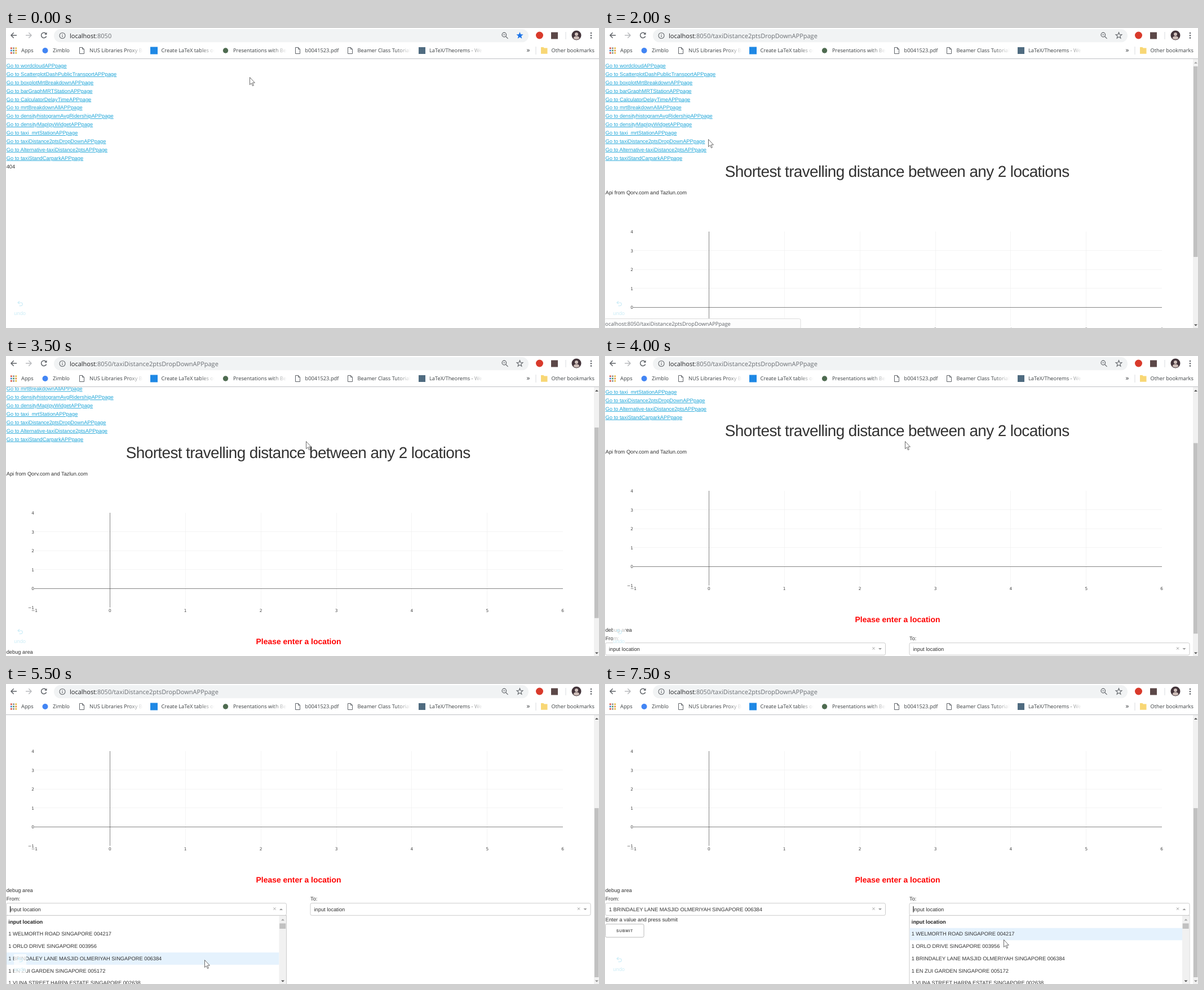
Recreate the animation shown at these times as an HTML page. Size 1052x532 px, loop 8000 ms.

```html
<!DOCTYPE html>
<html lang="en">
<head>
<meta charset="utf-8">
<title>Dash app walkthrough</title>
<style>
  html, body { margin: 0; width: 100%; height: 100%; overflow: hidden; background: #fff; }
  svg { display: block; }
  text { white-space: pre; text-rendering: geometricPrecision; }
  .page { font: 9.3px "Liberation Sans", Arial, sans-serif; fill: #323232; }
  .link { fill: #1ea5d8; text-decoration: underline; }
  .title { font-size: 27.95px; letter-spacing: -.62px; }
  .alert { font-size: 13.95px; font-weight: bold; fill: #f00; }
  .tick { font: 7.4px "DejaVu Sans", sans-serif; fill: #444; }
  .button { font-size: 6.8px; font-weight: bold; letter-spacing: .62px; fill: #555; }
  .bold { font-weight: bold; fill: #222; }
  .chrome { font: 9.3px "Open Sans", sans-serif; fill: #3c4043; }
  .url { font-size: 11px; }
  .status { font: 9.4px "Open Sans", sans-serif; fill: #5f6368; }
  .line { fill: none; stroke: #5f6368; stroke-width: 1.5; }
</style>
</head>
<body>
<svg id="stage" width="1052" height="532" viewBox="0 0 1052 532">
  <defs>
    <clipPath id="viewport"><rect y="55" width="1052" height="477"/></clipPath>
    <linearGradient id="fade"><stop stop-color="#fff" stop-opacity="0"/><stop offset="1" stop-color="#fff"/></linearGradient>
  </defs>
  <g id="page" clip-path="url(#viewport)"></g>
  <g id="chrome" class="chrome"></g>
  <g id="pointer"></g>
</svg>
<script>
const LOOP = 8000;
const VIEW = 477, TRACK_TOP = 68, TRACK = 452;
const ROUTE = 'taxiDistance2ptsDropDownAPPpage';
const LINKS = ['wordcloud', 'ScatterplotDashPublicTransport', 'boxplotMrtBreakdown',
  'barGraphMRTStation', 'CalculatorDelayTime', 'mrtBreakdownAll', 'densityhistogramAvgRidership',
  'densityMapIpyWidget', 'taxi_mrtStation', 'taxiDistance2ptsDropDown',
  'Alternative-taxiDistance2pts', 'taxiStandCarpark'];
const PLACES = ['input location', '1 WELMORTH ROAD SINGAPORE 004217', '1 ORLO DRIVE SINGAPORE 003956',
  '1 BRINDALEY LANE MASJID OLMERIYAH SINGAPORE 006384', '1 EN ZUI GARDEN SINGAPORE 005172',
  '1 VUNA STREET HARPA ESTATE SINGAPORE 002638'];

// Each step lists only what changes; the rest carries over.
const STEPS = [
  { at: 0, x: 432, y: 87, hand: false, app: false, scroll: 0, max: 161, status: '',
    bar: 0, menu: null, hover: 0, caret: false, from: 0, focus: false },
  { at: 500, x: 74, y: 163, hand: true },
  { at: 1000, x: 90, y: 185, status: 'wordcloudAPPpage' },
  { at: 1510, x: 140, y: 196, status: ROUTE },
  { at: 2000, x: 183, y: 197, hand: false, app: true },
  { at: 2500, x: 448, y: 180, status: '' },
  { at: 3010, x: 518, y: 159 },
  { at: 3500, x: 532, y: 151, scroll: 83 },
  { at: 4000, scroll: 122 },
  { at: 4500, scroll: 162, bar: 1 },
  { at: 5000, x: 362, y: 488, bar: .25 },
  { at: 5500, x: 352, y: 489, bar: 0, scroll: 242, max: 242, menu: 'from', hover: 3, caret: true },
  { at: 6000, x: 220, y: 486, caret: false },
  { at: 6510, x: 206, y: 485, caret: true },
  { at: 7000, x: 681, y: 465, scroll: 162, max: 161, menu: null, from: 3, focus: true, caret: false },
  { at: 7500, x: 707, y: 453, scroll: 242, max: 242, menu: 'to', hover: 1, focus: false, caret: true }
];
const states = [];
STEPS.forEach((step, i) => states.push({ ...states[i - 1], ...step }));

const text = (x, y, str, cls = '', more = '') => `<text x="${x}" y="${y}" class="${cls}" ${more}>${str}</text>`;
const rect = (x, y, w, h, fill, more = '') => `<rect x="${x}" y="${y}" width="${w}" height="${h}" fill="${fill}" ${more}/>`;
const path = (d, more = 'class="line"') => `<path d="${d}" ${more}/>`;
const dot = (x, y, r, fill) => `<circle cx="${x}" cy="${y}" r="${r}" fill="${fill}"/>`;
const fill = color => `fill="${color}"`;
const triangle = (x, y, size, dir, color) =>
  path(`M${x - size} ${y - dir * size / 2}h${2 * size}l${-size} ${dir * size}z`, fill(color));
const range = (n, fn) => Array.from({ length: n }, (_, i) => fn(i)).join('');

function plot() {
  const px = v => 184.3 + 133.9 * v, py = v => 495.5 - 33.55 * v;
  const snap = v => Math.floor(v) + .5;
  const label = v => v < 0 ? '−' + -v : v;
  const stroke = color => `stroke="${color}" stroke-width=".65" fill="none"`;
  const vertical = v => `M${snap(px(v))} 361V529`, horizontal = v => `M50 ${snap(py(v))}H988`;
  return path([1, 2, 3, 4, 5].map(vertical).join('') + [1, 2, 3].map(horizontal).join(''), stroke('#eee'))
    + path(vertical(0) + horizontal(0), stroke('#444'))
    + range(6, i => text(50, py(i - 1) + 2.8, label(i - 1), 'tick', 'text-anchor="end"'))
    + range(8, i => text(px(i - 1), 537.3, label(i - 1), 'tick', 'text-anchor="middle"'));
}

function modebar(opacity) {
  const icons = [859, 879, 895, 914, 929, 943, 958, 980, 994, 1008];
  const color = x => x === 879 || x === 1008 ? '#7c7c7c' : '#c7c7c7';
  return `<g opacity="${opacity}">` + icons.map((x, i) =>
    i === 1 ? dot(x, 307, 3.5, color(x)) + path(`M${x + 2} 309l3 3`, `stroke="${color(x)}" stroke-width="2"`)
    : i === 2 ? path(`M${x - 4} 307.5h8m-4-4v8`, `stroke="${color(x)}"`)
    : i === 7 ? path(`M${x} 303v9m-2-5h4`, `stroke="${color(x)}" stroke-dasharray="2 1"`)
    : i > 7 ? rect(x - 4.5, 304, 9, 3, color(x)) + rect(x - 4.5, 308, 9, 3, color(x))
    : rect(x - 4, 303.5, 8, 8, color(x), 'rx="1.5"')).join('')
    + rect(1023, 302.5, 10, 10, '#7cc3f2') + '</g>';
}

function select(x, value, open, focus, caret) {
  const border = focus ? '#2a8fe8' : '#ccc';
  return rect(x + .5, 630.7, 497, 21.6, '#fff', `rx="2.5" stroke="${border}"`)
    + text(x + 7, 644.5, value)
    + path(`M${x + 474.5} 638.5l4 4m0-4l-4 4`, 'stroke="#999"')
    + triangle(x + 488, 641.5, 3, open ? -1 : 1, '#999')
    + (caret ? rect(x + 7, 636, 1, 11, '#111') : '');
}

function menu(x, hover) {
  const top = 653, row = 21.7;
  return rect(x + .5, top - .5, 497, 125, '#fff', 'stroke="#ccc"')
    + rect(x + 1, top + hover * row, 483.5, row, '#e5f2fd')
    + PLACES.map((place, i) => text(x + 4.3, top + 13.7 + i * row, place, i ? '' : 'bold')).join('')
    + rect(x + 484.5, top, 12.5, 125, '#f1f1f1')
    + rect(x + 485.2, 666.5, 11, 9.5, '#c1c1c1')
    + triangle(x + 491, 660, 3, -1, '#a3a3a3')
    + triangle(x + 491, 769, 3, 1, '#505050');
}

function appPage(s) {
  const column = { from: 0, to: 539.5 };
  return text(212.8, 264, 'Shortest travelling distance between any 2 locations', 'title')
    + text(.7, 295, 'Api from Qorv.com and Tazlun.com')
    + plot() + (s.bar ? modebar(s.bar) : '')
    + text(519, 594.3, 'Please enter a location', 'alert', 'text-anchor="middle"')
    + text(.7, 611.4, 'debug area') + text(.7, 626.3, 'From:') + text(540, 626.3, 'To:')
    + select(column.from, PLACES[s.from], s.menu === 'from', s.focus, s.caret && s.menu === 'from')
    + select(column.to, PLACES[0], s.menu === 'to', false, s.caret && s.menu === 'to')
    + text(.7, 663.3, 'Enter a value and press submit')
    + rect(.5, 667.8, 68.5, 23.3, '#fff', 'rx="2.5" stroke="#bbb"')
    + text(20, 682, 'SUBMIT', 'button')
    + (s.menu ? menu(column[s.menu], s.hover) : '');
}

function scrollbar({ scroll, max }) {
  const ratio = TRACK / (VIEW + max);
  return rect(1043, 55, 9, 477, '#f1f1f1')
    + rect(1044, TRACK_TOP + scroll * ratio, 7.5, VIEW * ratio, '#c1c1c1')
    + triangle(1048, 61.5, 3, -1, scroll ? '#505050' : '#a3a3a3')
    + triangle(1048, 527, 3, 1, scroll < max ? '#505050' : '#8a8a8a');
}

function undo() {
  return rect(14, 479, 22, 34, '#fff', 'opacity=".7"')
    + path('M21.5 487h5a2.7 2.7 0 0 1 0 5.6h-3M24 484.5l-3 2.5 3 2.5', 'fill="none" stroke="#cdedf7" stroke-width="1.2"')
    + text(24.7, 509.3, 'undo', '', 'text-anchor="middle" style="fill:#cdedf7"');
}

function page(s) {
  const links = LINKS.map((name, i) => text(.7, 70 + i * 14.88, `Go to ${name}APPpage`, 'link')).join('');
  return `<g class="page"><g transform="translate(0 ${-s.scroll})">${links}`
    + (s.app ? appPage(s) : text(.7, 248.6, '404')) + '</g>'
    + undo() + '</g>' + (s.app ? scrollbar(s) : '')
    + (s.status ? rect(-1, 515.5, 348, 18, '#fdfdfd', 'rx="2.5" stroke="#ddd"')
      + text(-2, 528, 'localhost:8050/' + s.status, 'status') : '');
}

function star(cx, cy, r, more) {
  const points = Array.from({ length: 10 }, (_, i) => {
    const a = i * Math.PI / 5, d = i % 2 ? r * .42 : r;
    return [cx + d * Math.sin(a), cy - d * Math.cos(a)].map(v => v.toFixed(2)).join();
  });
  return path('M' + points.join('L') + 'z', more);
}

function toolbar(s) {
  const arrow = 'h-10m4.7-4.7l-4.7 4.7 4.7 4.7';
  return path('M19 13' + arrow)
    + path('M35 13h10m-4.7-4.7l4.7 4.7-4.7 4.7', 'class="line" style="stroke:#b9bbbe"')
    + path('M71 10a4.7 4.7 0 1 0 .6 4.6') + path('M72.5 7.5v4.3h-4.3z', fill('#5f6368'))
    + rect(85, 2, 842, 23.3, '#f1f3f4', 'rx="11.6"')
    + path('M95 13.5a5 5 0 1 0 10 0a5 5 0 1 0-10 0M100 12.8v3.5M100 10.5v1.3', 'class="line" style="stroke-width:1.1"')
    + text(113, 17.5, `<tspan fill="#202124">localhost</tspan><tspan fill="#6a6e73">:8050${s.app ? '/' + ROUTE : ''}</tspan>`, 'url')
    + path('M880 12a3.8 3.8 0 1 0 7.6 0a3.8 3.8 0 1 0-7.6 0M886.5 14.8l4 4M882 12h3.6', 'class="line" style="stroke-width:1.2"')
    + star(911.5, 13.5, s.app ? 5.7 : 6.5, s.app ? 'class="line" style="stroke-width:1.1"' : fill('#1a73e8'))
    + dot(946.5, 13, 6.5, '#d93a2b')
    + rect(967, 7.5, 12, 12, '#5c4848')
    + rect(992.5, 7, 1, 13, '#dadce0')
    + dot(1012, 13, 8.5, '#43343a') + dot(1012, 11, 3, '#cfbfba')
    + path('M1006.8 18.5q0-4 5.2-4t5.2 4q-5 4-10.4 0', fill('#cfbfba'))
    + range(3, i => dot(1038, 9 + i * 4.3, 1.3, '#5f6368'));
}

function bookmarks() {
  const colors = ['#d94f3d', '#e8883a', '#4c9b5f', '#3f7fd0', '#e5b93c', '#8a8a8a'];
  const doc = x => path(`M${x + .5} 34.5h5l3 3v8h-8zM${x + 5.5} 34.5v3h3`, 'class="line" style="stroke-width:1"');
  const label = (x, str, end) => text(x, 43, str)
    + (end ? rect(end - 26, 30, 26, 20, 'url(#fade)') + rect(end, 30, 12, 20, '#fff') : '');
  return range(9, i => rect(8 + i % 3 * 4.2, 34.5 + Math.floor(i / 3) * 4.2, 2.7, 2.7, colors[i * 5 % 6]))
    + label(27, 'Apps')
    + dot(69.5, 40, 5, '#4285f4') + label(83, 'Zimblo')
    + doc(130) + label(148, 'NUS Libraries Proxy Bo', 243)
    + label(275.5, 'Create LaTeX tables on', 370) + rect(256, 33.5, 13, 13, '#1e88e5')
    + label(403, 'Presentations with Bea', 498) + dot(389.5, 40, 4.7, '#4e6b50')
    + doc(513) + label(530.5, 'b0041523.pdf')
    + doc(606) + label(623.5, 'Beamer Class Tutorial', 718)
    + label(751, 'LaTeX/Theorems - We', 846) + rect(732, 34, 12, 12, '#4f6b80')
    + text(923.5, 43, '»', '', 'style="font-size:12px"')
    + rect(939.5, 33, 1, 14, '#dadce0')
    + path('M949 34h4.5l1.2 1.5h5.8v10.3H949z', fill('#f8d775'))
    + label(967.5, 'Other bookmarks');
}

function pointer({ x, y, hand }) {
  const shape = hand
    ? 'M3 1.2a1.2 1.2 0 0 1 2.4 0V6l4.6 1q1.3.4 1.2 2l-.7 4.2-.6 2H4.6L1 10.2q-.8-1.4.6-1.6L3 9.7z'
    : 'M.5.5V13.6L3.4 10.9 5.5 15.6 7.4 14.8 5.3 10.1H9.4z';
  return path(shape, `transform="translate(${x} ${y})" fill="#fff" stroke="#444" stroke-width=".8" stroke-linejoin="round"`);
}

const layer = id => document.getElementById(id);
let shown = -1;
function tick() {
  const t = performance.now() % LOOP;
  const index = states.findLastIndex(s => s.at <= t);
  if (index !== shown) {
    const s = states[shown = index];
    layer('page').innerHTML = page(s);
    layer('chrome').innerHTML = rect(0, 0, 1052, 54, '#fff') + toolbar(s) + bookmarks()
      + rect(0, 54, 1052, 1, '#bfc1c4');
    layer('pointer').innerHTML = pointer(s);
  }
  requestAnimationFrame(tick);
}
tick();
</script>
</body>
</html>
```
